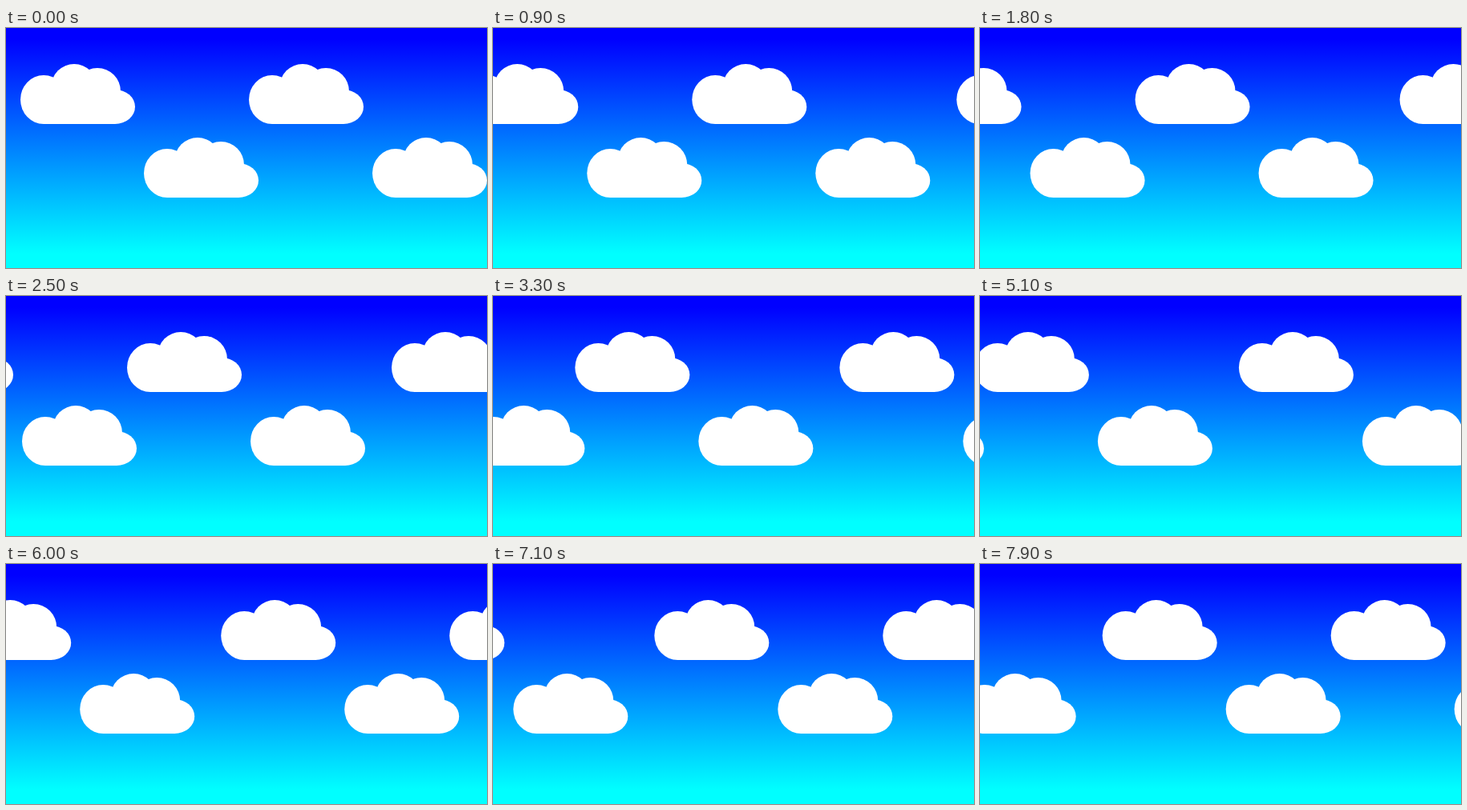
An HTML page that plays this animation: 600x300 px, repeating every 8 s.

```html
<!DOCTYPE html>
<html lang="en">
<head>
<meta charset="utf-8">
<title>Drifting clouds</title>
<style>
  html, body { margin: 0; width: 100%; height: 100%; overflow: hidden; }
  svg { display: block; width: 600px; height: 300px; }
</style>
</head>
<body>
<svg viewBox="0 0 600 300">
  <defs>
    <linearGradient id="sky" gradientUnits="userSpaceOnUse" x1="0" y1="14" x2="0" y2="282">
      <stop offset="0" stop-color="#00f"/>
      <stop offset="1" stop-color="#0ff"/>
    </linearGradient>
    <g id="cloud" fill="#fff">
      <ellipse cx="29" cy="44.5" rx="29" ry="30.5"/>
      <circle cx="67" cy="28.5" r="28.5"/>
      <circle cx="96" cy="34" r="29"/>
      <ellipse cx="118" cy="53.5" rx="25" ry="21.5"/>
      <path d="M29 45H42V30H118V75H29Z"/>
    </g>
  </defs>
  <rect width="600" height="300" fill="url(#sky)"/>
  <g id="drift"></g>
</svg>
<script>
  const LOOP = 8000, STEP = 100, SHIFT = 6.08;
  const ROWS = [{ x: 18, y: 45 }, { x: 172, y: 137 }];
  const OFFSETS = [0, 285, 615, 900];
  const drift = document.getElementById('drift');

  for (const row of ROWS) {
    for (const offset of OFFSETS) {
      const cloud = document.createElementNS('http://www.w3.org/2000/svg', 'use');
      cloud.setAttribute('href', '#cloud');
      cloud.setAttribute('x', row.x + offset);
      cloud.setAttribute('y', row.y);
      drift.append(cloud);
    }
  }

  const start = performance.now();

  function draw(now) {
    const time = Math.max(0, now - start) % LOOP;
    const x = -Math.floor(time / STEP) * SHIFT;
    drift.setAttribute('transform', `translate(${x.toFixed(2)} 0)`);
    requestAnimationFrame(draw);
  }
  draw(start);
</script>
</body>
</html>
```
